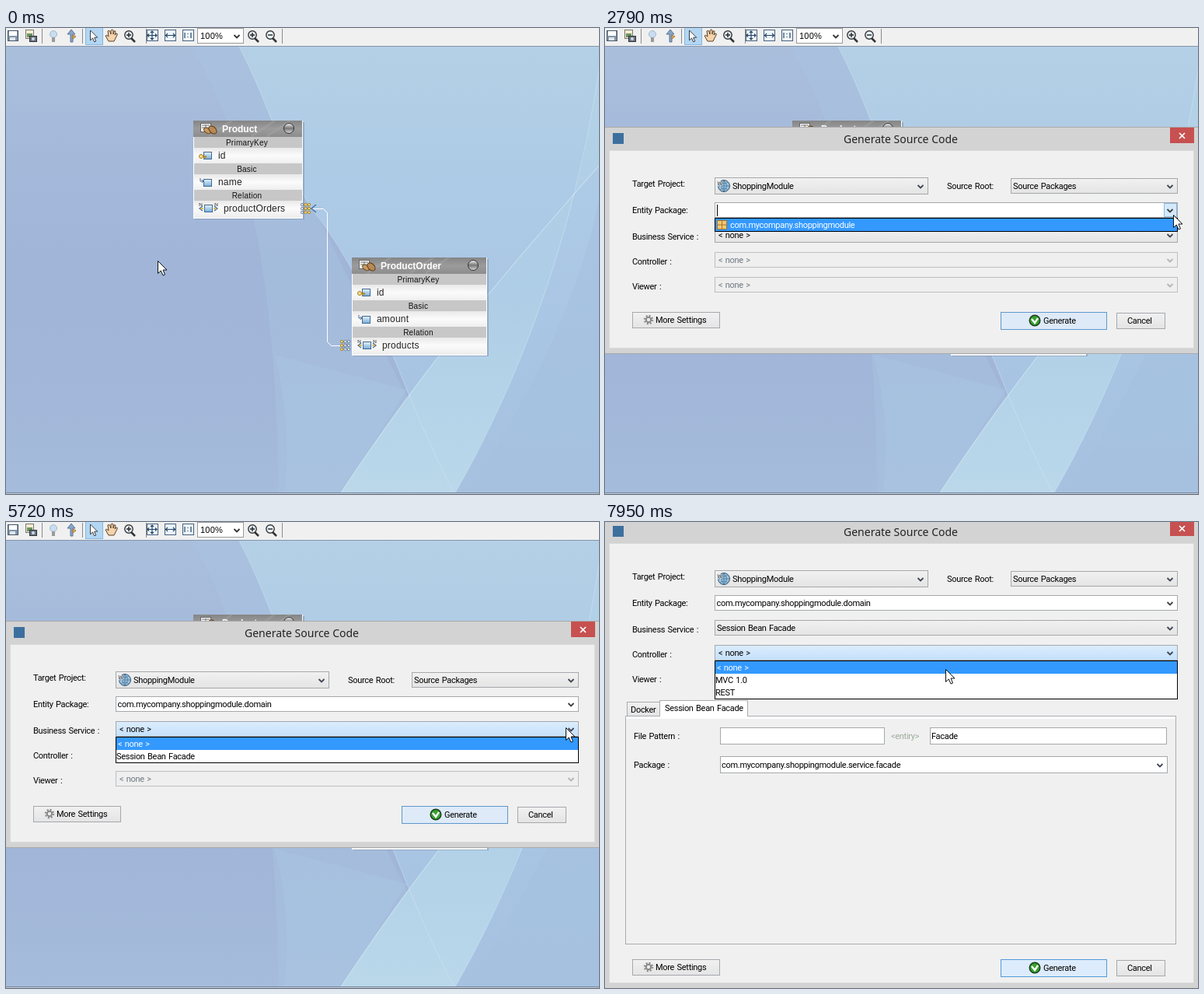
Recreate the animation shown at these times as an HTML page. Size 763 by 599 pixels, loop 8 s.

```html
<!DOCTYPE html>
<html lang="en">
<head>
<meta charset="utf-8">
<title>Generate Source Code</title>
<style>
html, body { margin: 0; width: 100%; height: 100%; overflow: hidden; background: #a4b8d9; }
svg { display: block; width: 763px; height: 599px; }
text { font: 11px Roboto, sans-serif; letter-spacing: -.3px; word-spacing: 1px; white-space: pre; }
text.title { font: 14px "Noto Sans", sans-serif; letter-spacing: 0; word-spacing: 0; }
text.name { font: bold 12px "Liberation Sans", sans-serif; letter-spacing: 0; }
text.row { font: 12px "Liberation Sans", sans-serif; letter-spacing: .2px; }
text.head { font: 10px "Liberation Sans", sans-serif; letter-spacing: .25px; }
</style>
</head>
<body>
<svg id="stage" viewBox="0 0 763 599" xmlns="http://www.w3.org/2000/svg"></svg>
<script>
const LOOP = 8000, OPEN = 1560, GROW = 6760;

// Drawing helpers; boxes are given by their outer pixels.
const fillBox = (x, y, w, h, fill, more = '') =>
  `<rect x="${x}" y="${y}" width="${w}" height="${h}" fill="${fill}" ${more}/>`;
const box = (x, y, w, h, fill, stroke, more = '') =>
  fillBox(x + .5, y + .5, w - 1, h - 1, fill, `stroke="${stroke}" ${more}`);
const path = (d, stroke, width = 1, fill = 'none', more = '') =>
  `<path d="${d}" fill="${fill}" stroke="${stroke}" stroke-width="${width}" ${more}/>`;
const dot = (x, y, r, fill, stroke = 'none', width = 1) =>
  `<circle cx="${x}" cy="${y}" r="${r}" fill="${fill}" stroke="${stroke}" stroke-width="${width}"/>`;
const text = (x, y, s, fill = '#000', more = '') =>
  `<text x="${x}" y="${y}" fill="${fill}" ${more}>${s.replace(/</g, '&lt;')}</text>`;
const group = (id, body) => `<g id="${id}">${body}</g>`;
const at = (x, y, body) => `<g transform="translate(${x} ${y})">${body}</g>`;
const gradient = (id, ...colors) => `<linearGradient id="${id}" x2="0" y2="1">` +
  colors.map((c, i) => `<stop offset="${i / (colors.length - 1)}" stop-color="${c}"/>`).join('') +
  '</linearGradient>';

const defs = '<defs>' +
  gradient('sky', '#abc0dc', '#a5badb', '#a0b5d7', '#a1b6d8', '#a6bcdc') +
  gradient('veil', '#b4d0e6', '#adcae6', '#a9c5e4', '#a6c1e0') +
  gradient('beam', '#b4d2e7', '#aecde6', '#bad8ea') +
  gradient('header', '#858585', '#9b9b9b', '#8d8d8d') +
  gradient('row', '#e9e9e9', '#fbfbfb', '#efefef') +
  gradient('face', '#f1f1f1', '#e4e4e4') +
  gradient('hot', '#dcedfd', '#c4e0fb') +
  gradient('ball', '#f4f4f4', '#777', '#ddd') +
  gradient('tile', '#e6f3fc', '#76add9') + '</defs>';

function wallpaper() {
  const leftEdge = 'M300,24 C345,110 362,190 398,238 C450,305 490,400 516,465 C540,525 560,565 577,599';
  const rightEdge = 'M768,20 C742,215 680,420 577,599';
  return fillBox(0, 0, 763, 599, 'url(#sky)') +
    path('M238,24 C300,120 350,310 350,599 H577 L400,240 L300,24Z', 'none', 0, '#a9c4e1', 'opacity=".5"') +
    path('M345,420 C360,470 365,540 358,599 H430 L516,465Z', 'none', 0, '#aac5e4', 'opacity=".5"') +
    path(leftEdge + ' H763 V24Z', 'none', 0, 'url(#veil)') +
    path('M430,599 C520,462 610,350 763,177 V50 C742,215 680,420 577,599Z', 'none', 0, 'url(#beam)') +
    path('M763,220 C735,360 660,500 590,599 H763Z', 'none', 0, '#a6c1e0', 'opacity=".55"') +
    path(leftEdge, '#d2e6f1', 1, 'none', 'opacity=".5"') +
    path(rightEdge, '#d2e8f2', 1, 'none', 'opacity=".5"') +
    path('M430,599 C520,462 610,350 763,177', '#dceff6', 1, 'none', 'opacity=".75"') +
    fillBox(0, 597, 763, 1, '#75869f') + fillBox(0, 598, 763, 1, '#c3cbd6');
}

function toolbar() {
  const lens = (x, sign) => path(`M${x + 3},13 l5,5`, '#333', 2.5) + dot(x, 9, 5.2, '#e8f3fb', '#333', 1.4) +
    path(`M${x - 3},9 h6` + (sign === '+' ? ` M${x},6 v6` : ''), '#222', 1.4);
  const frame = (x, d) => box(x - 7, 2, 15, 15, '#edf5fb', '#45617f') + path(d, '#24425f', 1.2);
  return fillBox(0, 0, 763, 23, '#f0f0f0') + fillBox(0, 23, 763, 1, '#8494ab') +
    [46, 98, 180, 355].map(x => fillBox(x, 1, 1, 19, '#8b8b8b')).join('') +
    box(2, 3, 14, 14, '#8195a8', '#46566a') + fillBox(4, 4, 10, 6, '#fff') + fillBox(5, 12, 7, 4, '#dfe6ee') +
    box(25, 2, 11, 12, '#f5ecd0', '#777') + fillBox(27, 7, 7, 5, '#6a9460') + box(30, 10, 10, 8, '#68737f', '#333') +
    dot(35, 14, 2, '#cde') +
    dot(61, 8, 4.5, '#c9ddf0', '#a4b8cc') + fillBox(59, 12, 4, 6, '#9a9a9a') +
    path('M84,2 l5,6 h-3 v10 h-3 v-10 h-4z', '#5b7597', 1, '#8aa5c6') + path('M86,9 l4,2 -4,3z', '#aa7a35', 1, '#e2ad58') +
    box(102, -1, 23, 23, '#b3d6f2', '#84b8e0') + at(108, 2.5, arrow(.8)) +
    path('M132,17 L128,10 q1,-2 4,1 L131,4 q2,-2 3,1 l1,3 0,-5 q2,-2 3,0 v5 l1,-4 q2,-1 2,1 l-1,4 2,-2 q2,0 1,2 l-4,8z', '#5c4028', 1, '#f3d4ad') +
    lens(158, '+') +
    frame(188, 'M188,4 v11 M182,9.5 h12 M186,6 l2,-2 2,2 M186,13 l2,2 2,-2 M184,7.5 l-2,2 2,2 M192,7.5 l2,2 -2,2') +
    frame(211, 'M206,9.5 h11 M208,7 l-2.500,2.500 2.500,2.500 M215,7 l2.500,2.500 -2.500,2.500') +
    frame(234, 'M230,6 v7 M238,6 v7 M234,7 v1 M234,11 v1') +
    box(246, 0, 60, 20, '#fff', '#9a9a9a') + chevron(297, 11, '#333') + text(250, 14, '100%', '#000', 'style="font:11px Liberation Sans,sans-serif;letter-spacing:.2px"') +
    lens(317, '+') + lens(340, '-');
}

function arrow(scale = 1) {
  return `<g transform="translate(.5 .5) scale(${scale})">` +
    path('M0,0 V16 L3.800,12.500 L6.500,18.500 L9,17.500 L6.500,11.500 H11.500Z', '#111', 1, '#fff') + '</g>';
}

const chevron = (x, y, color = '#404040') => path(`M${x - 3.5},${y - 2} l3.500,3.500 3.500,-3.500`, color, 1.8);

const tile = (x, y) => box(x, y, 11, 10, 'url(#tile)', '#44698f');
const rowIcons = {
  key: tile(13, -5) + path('M9,1 h8 M14,1 v3 M16,1 v2', '#b58a25', 1.5) + dot(10, 1, 2.5, '#ffe08a', '#a07a22'),
  basic: tile(13, -4) + path('M9,-5 v4 h4 m-2,-2 l2,2 -2,2', '#44698f'),
  relation: tile(14, -5) + path('M12,-3 l-4,3 4,3 M27,-3 l4,3 -4,3', '#3d6fa0', 1.3) +
    path('M8,-3 v-4 l3,4 v-4 M28,-3 v-4 l3,4 v-4', '#555', .8) + path('M9,0 h4 M26,0 h4', '#e0a428', 1.5)
};

function entity(x, y, width, name, rows) {
  const mid = width / 2 - 1.5;
  const sections = rows.map(([head, icon, label], i) => {
    const top = 21 + i * 34, wide = icon === 'relation';
    return fillBox(1, top, width - 2, 14, '#c7c7c7') +
      text(mid, top + 11, head, '#111', 'class="head" text-anchor="middle"') +
      fillBox(1, top + 14, width - 2, 20, 'url(#row)') + at(0, top + 24, rowIcons[icon]) +
      text(wide ? 39 : 32, top + 28, label, '#222', 'class="row"');
  }).join('');
  return at(x, y, fillBox(2, 2, width, 125, '#6f84a0', 'opacity=".45"') + box(0, 0, width, 126, '#eee', '#fff') +
    fillBox(0, 0, width - 1, 21, 'url(#header)') +
    path(`M20,20 L50,0 M75,20 L105,0 M95,20 L125,0`, '#aaa', 3, 'none', 'opacity=".35"') +
    box(9, 3, 14, 12, '#f4f4f4', '#666') + path('M11,6 h10 M11,9 h10 M16,5 v8', '#777') +
    `<ellipse cx="18" cy="13" rx="5" ry="3" transform="rotate(35 18 13)" fill="#c89b62" stroke="#674522"/>` +
    `<ellipse cx="25" cy="12" rx="6" ry="4" transform="rotate(45 25 12)" fill="#b88955" stroke="#5b3c1d"/>` +
    text(37, 15, name, '#fff', 'class="name"') + dot(width - 18, 10, 6.5, 'url(#ball)', '#333') + sections);
}

function joint(x, y, flip) {
  let s = path(`M${x},${y - 4} l9,4 -9,4 M${x},${y} h9 M${x + 9},${y - 4} l-9,8`, '#8593a5', .7);
  for (let i = 0; i < 9; i++) {
    const col = i % 3, warm = flip ? col > 0 : col < 1;
    s += dot(x + col * 4.5, y - 5 + Math.floor(i / 3) * 5, 1.7, warm ? '#ffd566' : '#dfe8f2', warm ? '#a0781c' : '#5e7289', .8);
  }
  return s;
}

const diagram = () =>
  path('M394,232.500 H408.500 L413.500,237.500 V403.500 L418.500,408.500 H432', '#fff') +
  entity(241, 119, 141, 'Product', [['PrimaryKey', 'key', 'id'], ['Basic', 'basic', 'name'], ['Relation', 'relation', 'productOrders']]) +
  entity(445, 295, 174, 'ProductOrder', [['PrimaryKey', 'key', 'id'], ['Basic', 'basic', 'amount'], ['Relation', 'relation', 'products']]) +
  joint(381, 232, true) + path('M399,227 l-6,5 6,5', '#3f70a5', 1.4) + joint(432, 408, false);

function contextMenu() {
  const items = ['Generate Source Code', 'Entity Package', 'Manage Visibility', 'Export as Image', 'Theme', 'Zoom', 'Select All', 'Refresh', 'Settings', 'Properties'];
  return fillBox(199, 303, 213, 228, '#000', 'opacity=".3"') + box(196, 300, 213, 228, '#f0f0f0', '#979797') +
    fillBox(223, 302, 1, 224, '#dedede') +
    group('menuHot', box(198, 302, 209, 22, '#cfe5f8', '#90bfe8')) +
    items.map((s, i) => text(230, 317 + i * 22.5, s)).join('') +
    dot(209, 313, 5.5, '#3f9b3b') + [2, 5, 7].map(i => fillBox(224, 300 + i * 22.5, 183, 1, '#d2d2d2')).join('');
}

function combo(x, y, w, h, fill, disabled) {
  return box(x, y, w, h, fill, disabled ? '#bfbfbf' : '#a5a8ad') +
    chevron(x + w - 10, y + Math.floor(h / 2) + 1, disabled ? '#b5b5b5' : '#404652');
}

function list(y, items, selected) {
  return box(141, y, 596, items.length * 16 + 2, '#fff', '#000') +
    fillBox(142, y + 1 + selected * 16, 594, 16, '#3399ff') +
    items.map((s, i) => text(s[0] === '<' ? 144 : 142, y + 13 + i * 16, s, i === selected ? '#fff' : '#000')).join('');
}

const frameOf = (y, h, back, close) => fillBox(0, y, 763, h, back) +
  path(`M0,${y + .5} H763 M0,${y + h - .5} H763`, '#a9a9a9') +
  fillBox(727, y + 1, 31, 20, close) + path(`M739,${y + 8} l7,7 m0,-7 l-7,7`, '#fff', 1.7) +
  box(5, y + 30, 753, h - 37, '#f0f0f0', '#d9d9d9');
const frames = (id, y, h) => group(id, frameOf(y, h, '#ebebeb', '#bcbcbc') +
  group(id + 'Active', frameOf(y, h, '#d3d3d3', '#c75050')));

function fields() {
  const labels = [['Target Project:', 204], ['Entity Package:', 238], ['Business Service :', 272], ['Controller :', 304], ['Viewer :', 336]];
  const none = (y, fill) => text(146, y, '< none >', fill);
  const globe = dot(153, 203, 7.5, '#9cc3e0', '#37546f') +
    path('M146,203 h14 M153,196 v14 M148,198 q5,4 10,0 M148,208 q5,-4 10,0 M153,196 q-7,7 0,14 M153,196 q7,7 0,14', '#4a7699', .8) +
    path('M145,197 l1,5 2,-4 1,4 2,-5', '#fff', 1.5) + path('M145,197 l1,5 2,-4 1,4 2,-5', '#333', .7);
  const typed = 'com.mycompany.shoppingmodule';
  return fillBox(10, 135, 14, 14, '#3d6f9e') +
    text(307, 148, 'Generate Source Code', '#222', 'class="title"') +
    labels.map(([s, y]) => text(35, y, s)).join('') + text(440, 207, 'Source Root:') +
    combo(141, 192, 275, 22, 'url(#face)') + globe + text(164, 207, 'ShoppingModule') +
    combo(522, 193, 215, 20, 'url(#face)') + text(525, 207, 'Source Packages') +
    box(141, 224, 596, 20, '#fff', '#a5a8ad') + group('entityHot', box(719, 225, 17, 18, '#d5e9fb', '#8db9df')) + chevron(727, 235) +
    group('entityText', `<text id="entry" x="143.500" y="238"><tspan>${typed}</tspan>` +
      [...'.domain'].map(c => `<tspan class="key">${c}</tspan>`).join('') + '</text>') +
    group('caret', fillBox(0, 227, 1, 15, '#000')) +
    combo(141, 256, 596, 20, 'url(#face)') + group('serviceHot', combo(141, 256, 596, 20, 'url(#hot)')) +
    group('serviceNone', none(270)) + group('serviceSet', text(144, 270, 'Session Bean Facade')) +
    combo(141, 288, 596, 20, '#efefef', true) + group('controllerOff', none(302, '#6d7780')) +
    group('controllerOn', combo(141, 288, 596, 20, 'url(#face)') + group('controllerHot', combo(141, 288, 596, 20, 'url(#hot)')) + none(302)) +
    combo(141, 320, 596, 20, '#efefef', true) + none(334, '#6d7780') +
    group('entityList', box(141, 244, 596, 18, '#3399ff', '#000') + box(144, 247, 13, 12, '#f2c671', '#a8752a') +
      path('M144,253 h13 M150.500,247 v12', '#a8752a') + text(161, 257, typed, '#fff')) +
    group('serviceList0', list(276, ['< none >', 'Session Bean Facade'], 0)) +
    group('serviceList1', list(276, ['< none >', 'Session Bean Facade'], 1)) +
    group('controllerList', list(308, ['< none >', 'MVC 1.0', 'REST'], 0));
}

const tabs = () => box(26, 249, 709, 294, '#f0f0f0', '#a9acb0') + fillBox(27, 250, 707, 3, '#fff') +
  box(28, 231, 43, 19, 'url(#face)', '#a9acb0') + text(33, 245, 'Docker') +
  box(70, 229, 114, 24, '#fff', '#a9acb0') + fillBox(70, 250, 114, 3, '#fff') + text(77, 243, 'Session Bean Facade') +
  text(37, 279, 'File Pattern :') + box(148, 264, 212, 22, '#fff', '#a5a8ad') + text(368, 279, '<entiry>', '#9cab9c') +
  box(418, 264, 305, 22, '#fff', '#a5a8ad') + text(420, 279, 'Facade') +
  text(37, 316, 'Package :') + combo(148, 301, 576, 22, '#fff') + text(150, 316, 'com.mycompany.shoppingmodule.service.facade');

const buttons = () =>
  box(35, 365, 113, 21, 'url(#face)', '#a5a8ad') + dot(56, 375, 3.2, 'none', '#888', 2) +
  `<circle cx="56" cy="375" r="5.200" fill="none" stroke="#888" stroke-width="2" stroke-dasharray="2 2.080"/>` + text(65, 379, 'More Settings') +
  box(509, 365, 137, 23, '#e1e5ee', '#8492a6') + group('glow', box(509, 365, 137, 23, '#ddedfe', '#4b9ce0')) +
  dot(553, 376, 6.8, '#37a12f', '#1d3a1c', 1.4) + path('M549,374 l4,5 4,-6', '#fff', 2.4) + text(564, 380, 'Generate') +
  box(658, 366, 63, 21, 'url(#face)', '#a5a8ad') + text(672, 380, 'Cancel');

document.getElementById('stage').innerHTML = defs + wallpaper() + toolbar() + diagram() +
  group('menu', contextMenu()) +
  group('dialog', frames('small', 127, 292) + frames('large', -3, 603) + group('tabs', tabs()) +
    group('fields', fields()) + group('buttons', buttons())) +
  group('cursor', arrow());

// Motion: each table holds [time, value]; values hold until the next entry.
const el = id => document.getElementById(id);
function play(target, prop, table, easing = 'steps(1, end)') {
  const keys = table.map(([time, value]) => ({ offset: time / LOOP, [prop]: value, easing }));
  keys.push({ offset: 1, [prop]: table[table.length - 1][1] });
  target.animate(keys, { duration: LOOP, iterations: Infinity });
}
function show(target, from, to = LOOP) {
  const table = from ? [[0, 0], [from, 1]] : [[0, 1]];
  if (to < LOOP) table.push([to, 0]);
  play(target, 'opacity', table);
}
const move = (target, table) =>
  play(target, 'transform', table.map(([time, x, y]) => [time, `translate(${x}px, ${y}px)`]));

const visible = {
  menu: [680, OPEN], menuHot: [1040], dialog: [OPEN],
  small: [0, GROW], smallActive: [2090], large: [GROW], largeActive: [7270], tabs: [GROW],
  entityHot: [2610, 3130], entityList: [2790, 3130], entityText: [3130], caret: [2610, 5530],
  serviceHot: [5350, GROW], serviceNone: [0, GROW], serviceSet: [GROW],
  serviceList0: [5720, 6420], serviceList1: [6420, GROW],
  controllerOff: [0, GROW], controllerOn: [GROW], controllerHot: [7610], controllerList: [7780]
};
for (const id in visible) show(el(id), ...visible[id]);

move(el('fields'), [[0, 0, 0], [GROW, 0, -130]]);
move(el('buttons'), [[0, 0, 0], [GROW, 0, 197]]);
move(el('cursor'), [
  [0, 195, 299], [1040, 222, 308], [OPEN, 638, 296], [1910, 646, 290], [2090, 668, 278], [2260, 702, 256],
  [2450, 726, 243], [2610, 731, 240], [2960, 725, 248], [5180, 724, 253], [5350, 722, 259], [5530, 720, 264],
  [6080, 718, 273], [6250, 716, 285], [6420, 713, 295], [6600, 712, 297], [GROW, 576, 434], [7090, 545, 380],
  [7270, 495, 288], [7440, 452, 215], [7610, 440, 169], [7950, 438, 189]
]);

const entry = el('entry'), baseLength = 28;
const endOf = count => Math.round(entry.getEndPositionOfChar(count - 1).x);
const caretSteps = [[0, 144, 0], [3130, endOf(baseLength), 0]];
document.querySelectorAll('#entry .key').forEach((key, i) => {
  const time = Math.round(3810 + i * 173);
  const fill = [[0, 'transparent'], [time, '#000']];
  play(key, 'fill', fill);
  caretSteps.push([time, endOf(baseLength + i + 1), 0]);
});
move(el('caret'), caretSteps);

play(el('glow'), 'opacity', [
  [0, .6], [OPEN, .6], [2100, .2], [2790, .65], [3200, .9], [4000, .1], [4670, .1], [5300, .8],
  [5900, .6], [6600, .1], [6740, .1], [GROW, .9], [7300, .5], [7950, .9]
], 'linear');
</script>
</body>
</html>
```
